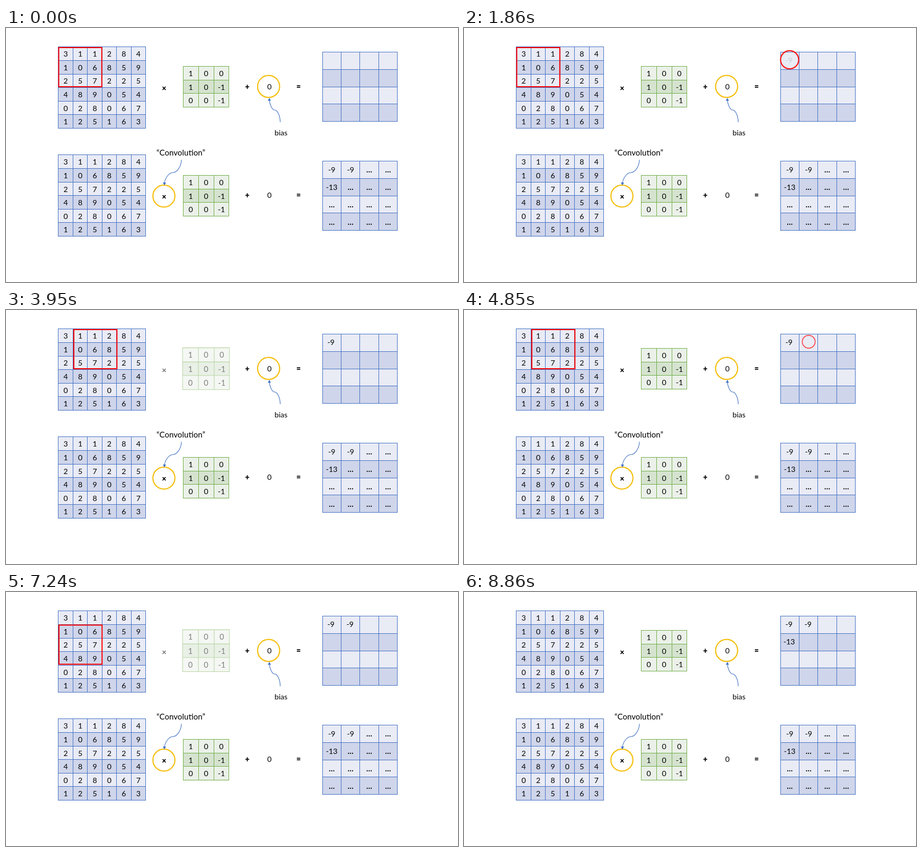
Animation of 853 by 480 pixels, one loop 8.92 s. Source, as an HTML page:

```html
<!DOCTYPE html>
<html lang="en">
<head>
<meta charset="utf-8">
<title>Convolution step by step</title>
<style>
  html, body { margin: 0; width: 100%; height: 100%; overflow: hidden; background: #fff; }
  svg { display: block; width: 853px; height: 480px; }
  text { font: 14.2px Lato, Carlito, sans-serif; text-anchor: middle; fill: #000; }
  .bold { font-weight: bold; }
  .sign { font-weight: 900; }
  .title { font-size: 15.1px; }
</style>
</head>
<body>
<svg id="stage" viewBox="0 0 853 480"></svg>
<script>
const BLUE = { line: '#4472c4', bands: ['#e9ebf5', '#cfd5ea'] };
const GREEN = { line: '#70ad47', bands: ['#ebf1e9', '#d5e3cf'] };
const INPUT = ['3 1 1 2 8 4', '1 0 6 8 5 9', '2 5 7 2 2 5', '4 8 9 0 5 4', '0 2 8 0 6 7', '1 2 5 1 6 3'];
const KERNEL = ['1 0 0', '1 0 -1', '0 0 -1'];
const RESULT = ['-9 -9 … …', '-13 … … …', '… … … …', '… … … …'];
const stage = document.getElementById('stage');

function add(tag, attrs, parent = stage) {
  const node = document.createElementNS('http://www.w3.org/2000/svg', tag);
  for (const key in attrs) node.setAttribute(key, attrs[key]);
  return parent.appendChild(node);
}

// The y coordinate is the middle of a digit.
function label(text, x, y, className = '', parent = stage) {
  const node = add('text', { x, y: y + 5.2, class: className }, parent);
  node.textContent = text;
  return node;
}

function table(x, y, width, height, size, style, rows = []) {
  const group = add('g', {});
  const col = i => Math.floor(x + width * i / size) + 0.5;
  const row = i => Math.floor(y + height * i / size) + 0.5;
  let lines = '';
  for (let i = 0; i < size; i++) {
    add('rect', { x: col(0), y: row(i), width: col(size) - col(0), height: row(i + 1) - row(i),
      fill: style.bands[i % 2] }, group);
  }
  for (let i = 0; i <= size; i++) {
    lines += `M${col(i)} ${row(0)}V${row(size)}M${col(0)} ${row(i)}H${col(size)}`;
  }
  add('path', { d: lines, stroke: style.line, 'stroke-linecap': 'square' }, group);
  rows.forEach((cells, r) => cells.split(' ').forEach((cell, c) =>
    label(cell, x + width * (c + 0.5) / size, y + height * (r + 0.5) / size + 0.4,
      cell === '…' ? 'bold' : '', group)));
  return group;
}

function ring(cx, cy, r, stroke, width) {
  return add('circle', { cx, cy, r, stroke, fill: 'none', 'stroke-width': width });
}

// S-shaped connector that ends in a vertical arrowhead.
function arrow(x1, y1, x2, y2) {
  const mid = (y1 + y2) / 2, quarter = (x2 - x1) / 4, back = y1 > y2 ? 5.5 : -5.5;
  add('path', { fill: 'none', stroke: BLUE.line, 'stroke-width': 1.1,
    d: `M${x1} ${y1}C${x1} ${(y1 + mid) / 2} ${x1 + quarter} ${mid} ${(x1 + x2) / 2} ${mid}` +
       `S${x2} ${(mid + y2) / 2} ${x2} ${y2 + back / 2}` });
  add('path', { fill: BLUE.line, d: `M${x2} ${y2}l-3 ${back}h6z` });
}

function equation(inputY, kernelY, resultY, middle, rows) {
  table(98.8, inputY, 164.9, 153.5, 6, BLUE, INPUT);
  const kernel = table(334.3, kernelY, 86.6, 77.3, 3, GREEN, KERNEL);
  table(597, resultY, 141.7, 131.7, 4, BLUE, rows);
  const times = label('×', 298.4, middle + 2.5, 'sign');
  label('+', 455.3, middle, 'sign');
  label('0', 497, middle);
  label('=', 552, middle, 'sign');
  return { kernel, times };
}

const upper = equation(35.85, 72.35, 45.2, 111, []);
equation(239.97, 278.37, 251.2, 316, RESULT);
ring(495.6, 110.4, 20.8, '#f5c012', 2.2);
ring(298, 317.6, 20.8, '#f5c012', 2.2);
arrow(517.5, 178, 497, 132);
arrow(331, 249, 299, 297.5);
label('bias', 519, 198);
label('“Convolution”', 330, 236, 'title');

const cycles = [
  { start: 60, box: [99.5, 37], x: 614.5, y: 60, value: '-9' },
  { start: 3350, box: [128, 37], x: 650.5, y: 60, value: '-9' },
  { start: 6640, box: [100, 62.5], x: 615, y: 93, value: '-13' }
];
for (const cycle of cycles) cycle.text = label(cycle.value, cycle.x - 1.3, cycle.y + 0.8);
const frame = add('rect', { width: 81.3, height: 74, fill: 'none', stroke: '#f00', 'stroke-width': 2 });
const marker = add('g', {});
marker.append(ring(0, 0, 17.1, '#f00', 2.3));

const LOOP = 8920, TICK = 60, SLOW = 15.5, FADE = 8;
const clamp = v => Math.max(0, Math.min(1, v));

function scaleAbout(node, x, y, s) {
  node.setAttribute('transform', `translate(${x} ${y}) scale(${s}) translate(${-x} ${-y})`);
}

function render(t) {
  const current = t < cycles[1].start ? 0 : t < cycles[2].start ? 1 : 2;
  const cycle = cycles[current];
  const step = Math.floor((t - cycle.start) / TICK) + 1;

  // Pulse: grow by 5% and back, dimmed to half in between.
  const pulse = clamp(step / SLOW);
  const size = 1 + 0.05 * (1 - Math.abs(2 * pulse - 1));
  const opacity = 1 - 0.5 * Math.min(1, pulse / 0.2, (1 - pulse) / 0.2);
  scaleAbout(upper.kernel, 378, 111.3, size);
  scaleAbout(upper.times, 298.4, 113.5, size);
  upper.kernel.setAttribute('opacity', opacity);
  upper.times.setAttribute('opacity', opacity);

  // The marker zooms in, then gives way to the value.
  const zoom = clamp((step - 15) / SLOW);
  const shown = clamp((step - 30) / FADE);
  marker.setAttribute('transform', `translate(${cycle.x} ${cycle.y}) scale(${step > 30 ? 1 : zoom})`);
  marker.setAttribute('opacity', step > 30 ? 1 - shown : zoom);
  cycles.forEach((c, i) => c.text.setAttribute('opacity', i < current ? 1 : i > current ? 0 : shown));

  frame.setAttribute('x', cycle.box[0]);
  frame.setAttribute('y', cycle.box[1]);
  frame.setAttribute('opacity', current === 2 && shown === 1 ? 0 : 1);
}

function loop() {
  render(performance.now() % LOOP);
  requestAnimationFrame(loop);
}
loop();
</script>
</body>
</html>
```
